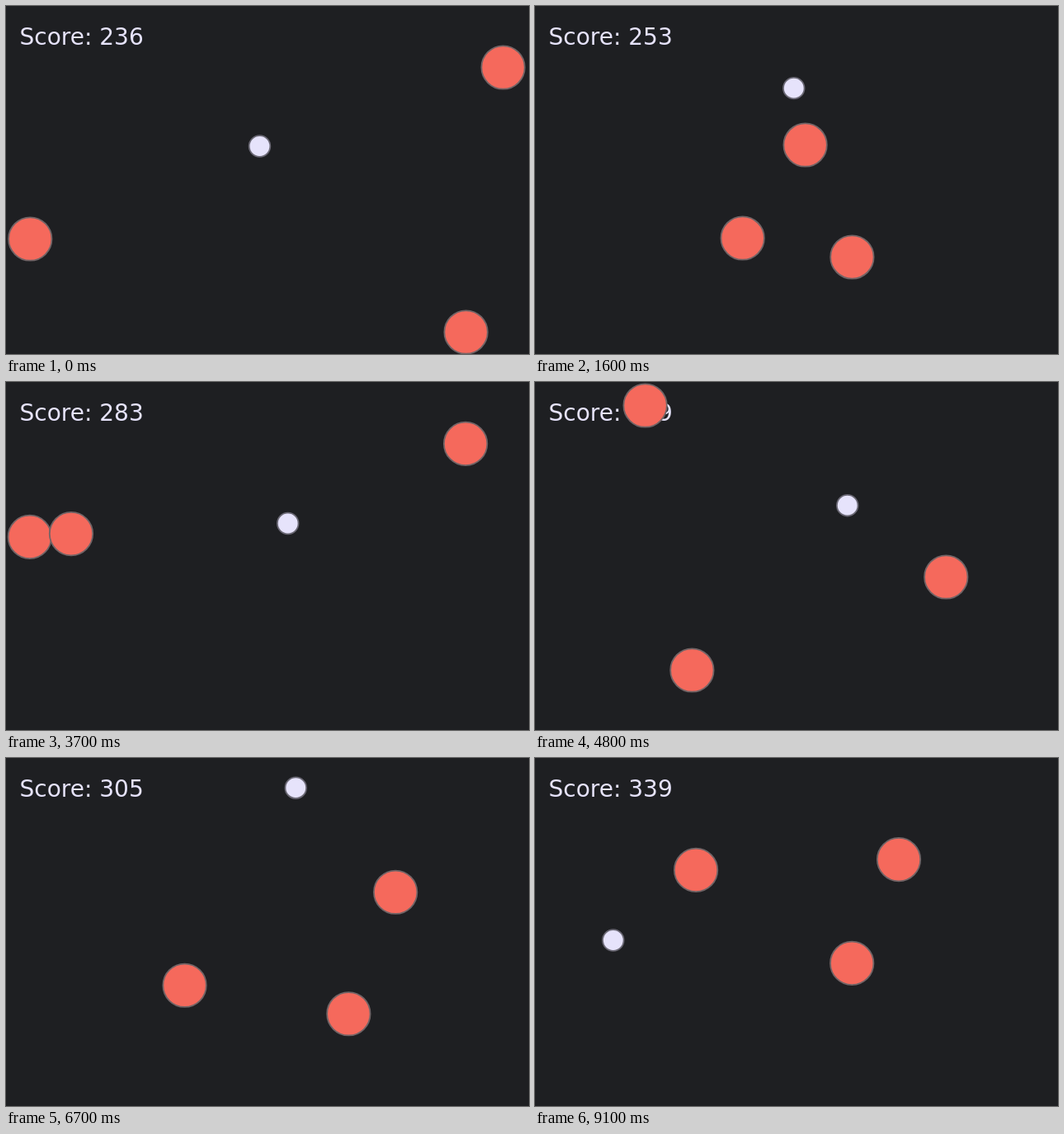
Recreate the animation shown at these times as an HTML page with a canvas. Size 634 by 422 pixels, loop 9.2 s.

```html
<!DOCTYPE html>
<html lang="en">
<head>
<meta charset="utf-8">
<title>Dodge the balls</title>
<style>
  html, body { margin: 0; width: 100%; height: 100%; overflow: hidden; background: #1e1f22; }
  canvas { display: block; }
</style>
</head>
<body>
<canvas id="stage" width="634" height="422"></canvas>
<script>
const ctx = document.getElementById('stage').getContext('2d');
const LOOP = 9200, STEP = 100;
const WALL = 25.5, SPAN_X = 583, SPAN_Y = 371.5;

// Start of each enemy on both axes, unfolded: travel is added, then folded at the walls.
const enemies = [[-532.1, 370], [-3.8, 257], [577.1, 49]];

// Enemies speed up slowly; all cover the same distance on each axis.
const travel = t => 0.143 * t + 4.6e-7 * t * t;

// Key points of the player: [time, score, x, y]
const keys = [
  [0, 236, 307.5, 170],
  [800, 248, 256, 148],
  [2400, 257, 372.5, 71],
  [3700, 283, 341.7, 171.5],
  [5800, 295, 411.5, 100],
  [6500, 303, 375, 25],
  [7700, 316, 211.5, 152.5],
  [9100, 339, 94.8, 221]
];

// Score (linear) and position (smooth curve through the key points) at time t
function playerAt(t) {
  let i = 0;
  while (i < keys.length - 2 && t >= keys[i + 1][0]) i++;
  const a = keys[i], b = keys[i + 1], span = b[0] - a[0], s = (t - a[0]) / span;
  const slope = (k, axis) => {
    const p = keys[Math.max(k - 1, 0)], n = keys[Math.min(k + 1, keys.length - 1)];
    return (n[axis] - p[axis]) / (n[0] - p[0]) * span;
  };
  const curve = axis => a[axis] + (b[axis] - a[axis]) * s * s * (3 - 2 * s)
    + slope(i, axis) * s * (1 - s) ** 2 - slope(i + 1, axis) * s * s * (1 - s);
  return { score: Math.round(a[1] + (b[1] - a[1]) * s), x: curve(2), y: curve(3) };
}

function bounce(u, span) {
  const m = (u + 2 * span) % (2 * span);
  return WALL + span - Math.abs(span - m);
}

function ball(x, y, r, fill, edge) {
  ctx.beginPath();
  ctx.arc(x, y, r, 0, 2 * Math.PI);
  ctx.fillStyle = fill;
  ctx.fill();
  ctx.strokeStyle = edge;
  ctx.lineWidth = 1.8;
  ctx.stroke();
}

function draw(t) {
  ctx.fillStyle = '#1e1f22';
  ctx.fillRect(0, 0, 634, 422);

  const player = playerAt(t);
  ctx.fillStyle = '#e6e3fb';
  ctx.font = '28px "DejaVu Sans", sans-serif';
  ctx.fillText('Score: ' + player.score, 16.5, 46.5);

  const d = travel(t);
  for (const [x, y] of enemies)
    ball(bounce(x + d, SPAN_X), bounce(y + d, SPAN_Y), 26.2, '#f5695c', '#726466');
  ball(player.x, player.y, 12.8, '#e6e3fb', '#6a6874');
}

const start = performance.now();
function frame() {
  const t = (performance.now() - start) % LOOP;
  draw(Math.floor(t / STEP) * STEP);
  requestAnimationFrame(frame);
}
frame();
</script>
</body>
</html>
```
